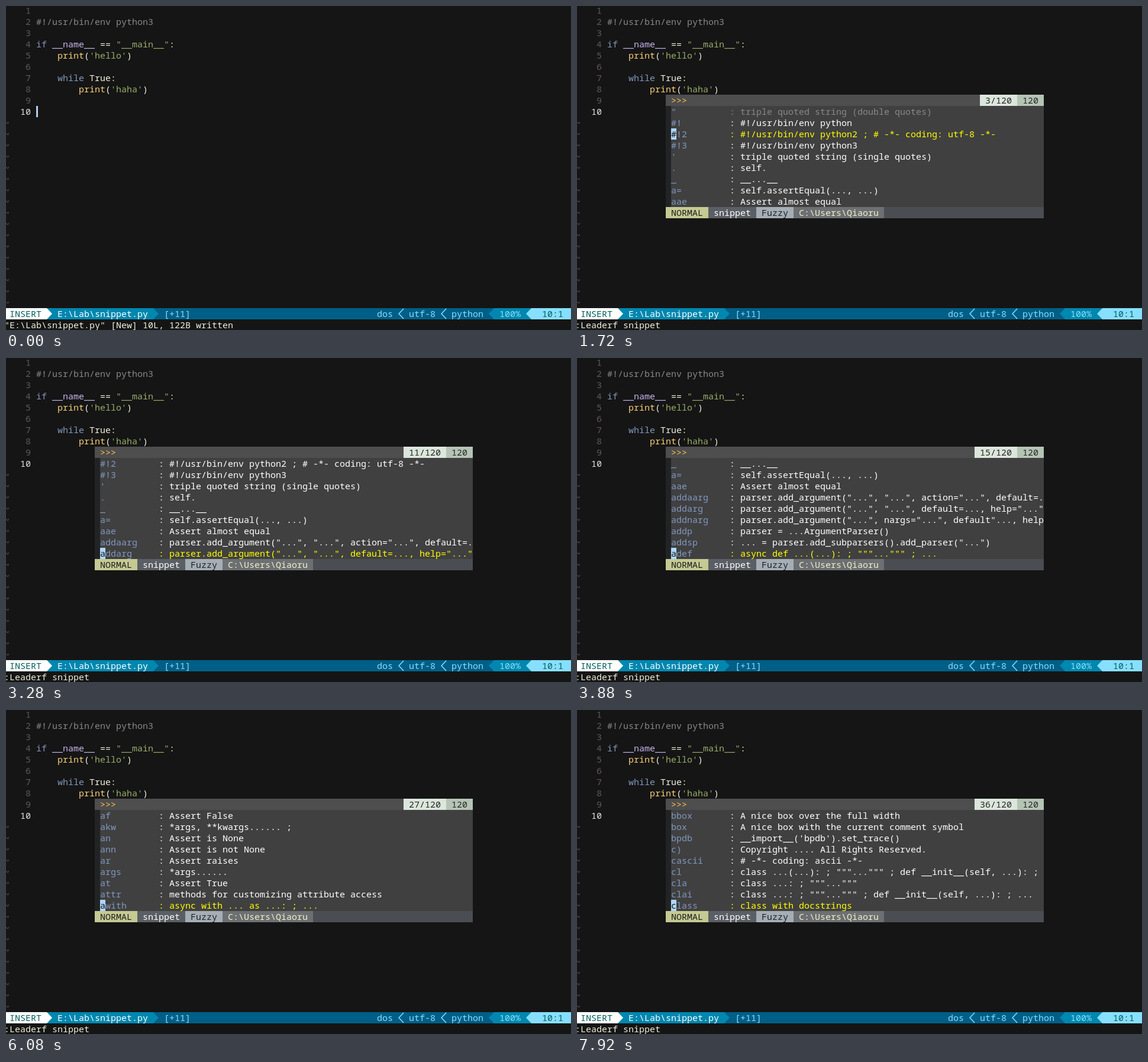
Write an HTML page that moves like this. It is 955x548 px and loops after 8 s.

```html
<!DOCTYPE html>
<html lang="en">
<head>
<meta charset="utf-8">
<title>Snippet finder</title>
<style>
  html, body { margin: 0; width: 100%; height: 100%; overflow: hidden; background: #151515; }
  svg { display: block; width: 955px; height: 548px; }
  text { font: 500 15px "Noto Sans Mono", monospace; font-variant-ligatures: none; white-space: pre; }
</style>
</head>
<body>
<svg viewBox="0 0 955 548">
  <g id="editor"></g>
  <g id="status"></g>
  <g id="popup"></g>
</svg>
<script>
const LOOP = 8000, ROWS = 9;
const FG = '#f0f0dc', BLUE = '#8197bf', GREEN = '#99ad6a', GOLD = '#fad07a', GREY = '#888888';

// Character grid: 9 x 19 px cells
const px = col => col * 9 - 3;
const py = row => row * 19 - 2;
const escapeText = s => s.replace(/&/g, '&amp;').replace(/</g, '&lt;').replace(/>/g, '&gt;');
const text = (col, row, str, fill) =>
  `<text x="${px(col)}" y="${py(row) + 15}" fill="${fill}">${escapeText(str)}</text>`;
const box = (col, row, cols, fill, rows = 1) =>
  `<rect x="${px(col)}" y="${py(row)}" width="${cols * 9}" height="${rows * 19}" fill="${fill}"/>`;
const runs = (col, row, ...parts) => parts.map(([str, fill]) => {
  const out = text(col, row, str, fill);
  col += str.length;
  return out;
}).join('');
const arrow = (col, row, dir, fill) => {
  const x = px(dir > 0 ? col : col + 1), y = py(row);
  return `<path d="M${x} ${y}l${9 * dir} 9.5l${-9 * dir} 9.5z" fill="${fill}"/>`;
};
const chevron = (col, row, stroke) =>
  `<path d="M${px(col + 1)} ${py(row) + 1}l-8 8.5l8 8.5" fill="none" stroke="${stroke}" stroke-width="1.5"/>`;

function drawEditor(command, cursor) {
  let out = '';
  for (let n = 1; n <= 10; n++)
    out += text(3, n - 1, String(n).padStart(2), n === 10 ? '#e8e4e0' : '#605958');
  for (let row = 10; row < 27; row++) out += text(0, row, '~', '#606060');
  out += text(6, 1, '#!/usr/bin/env python3', GREY);
  out += runs(6, 3, ['if ', BLUE], ['__name__', '#c6b6ee'], [' == ', FG], ['"__main__"', GREEN], [':', FG]);
  out += runs(10, 4, ['print', GOLD], ['(', FG], ["'hello'", GREEN], [')', FG]);
  out += runs(10, 6, ['while ', BLUE], ['True:', FG]);
  out += runs(14, 7, ['print', GOLD], ['(', FG], ["'haha'", GREEN], [')', FG]);
  if (cursor) out += `<rect x="51" y="169" width="3" height="19" fill="#b0d0f0"/>`;
  return out + text(0, 28, command, FG);
}

const THEMES = {
  INSERT: { mode: '#ffffff', modeFg: '#005f5f', mid: '#0087af', bar: '#005f87', soft: '#87dfff', end: '#87dfff', endFg: '#005f5f' },
  NORMAL: { mode: '#afdf00', modeFg: '#005f00', mid: '#585858', bar: '#303030', soft: '#9e9e9e', end: '#d0d0d0', endFg: '#606060' }
};

function drawStatus(mode) {
  const c = THEMES[mode], row = 27;
  return box(0, row, 107, c.bar)
    + box(0, row, 28, c.mid) + arrow(28, row, 1, c.mid)
    + box(0, row, 8, c.mode) + arrow(8, row, 1, c.mode)
    + text(1, row, mode, c.modeFg)
    + text(10, row, 'E:\\Lab\\snippet.py', '#ffffff')
    + text(30, row, '[+11]', c.soft)
    + text(70, row, 'dos', c.soft) + chevron(74, row, c.soft)
    + text(76, row, 'utf-8', c.soft) + chevron(82, row, c.soft)
    + text(84, row, 'python', c.soft)
    + arrow(91, row, -1, c.mid) + box(92, row, 15, c.mid)
    + text(93, row, '100%', c.soft)
    + arrow(98, row, -1, c.end) + box(99, row, 8, c.end)
    + text(101, row, '10:1', c.endFg);
}

const SNIPPETS = String.raw`" : triple quoted string (double quotes)
#! : #!/usr/bin/env python
#!2 : #!/usr/bin/env python2 ; # -*- coding: utf-8 -*-
#!3 : #!/usr/bin/env python3
' : triple quoted string (single quotes)
. : self.
_ : __...__
a= : self.assertEqual(..., ...)
aae : Assert almost equal
addaarg : parser.add_argument("...", "...", action="...", default=.
addarg : parser.add_argument("...", "...", default=..., help="..."
addnarg : parser.add_argument("...", nargs="...", default"..., help
addp : parser = ...ArgumentParser()
addsp : ... = parser.add_subparsers().add_parser("...")
adef : async def ...(...): ; """...""" ; ...
adeff : async def ...(...): ; ...
adefm : async def ...(self, ...): ; ... ;
ae : Assert equal
af : Assert False
akw : *args, **kwargs...... ;
an : Assert is None
ann : Assert is not None
ar : Assert raises
args : *args......
at : Assert True
attr : methods for customizing attribute access
awith : async with ... as ...: ; ...
bbox : A nice box over the full width
box : A nice box with the current comment symbol
bpdb : __import__('bpdb').set_trace()
c) : Copyright .... All Rights Reserved.
cascii : # -*- coding: ascii -*-
cl : class ...(...): ; """...""" ; def __init__(self, ...): ;
cla : class ...: ; """..."""
clai : class ...: ; """...""" ; def __init__(self, ...): ; ...
class : class with docstrings`.split('\n').map(line => {
  const at = line.indexOf(' : ');
  return [line.slice(0, at), line.slice(at + 1)];
});

function drawPopup(selected, mode) {
  const normal = mode === 'NORMAL';
  const count = ` ${selected}/120 `, countCol = 83 - count.length;
  let out = box(17, 8, 71, '#4e4e4e') + text(18, 8, '>>>', '#ffc04b')
    + box(countCol, 8, count.length, '#dce6dc') + text(countCol, 8, count, '#262626')
    + box(83, 8, 5, '#b5c4b5') + text(83, 8, ' 120 ', '#262626')
    + box(17, 9, 1, '#222324', ROWS) + box(18, 9, 70, '#404040', ROWS);
  if (!normal) out += box(22, 8, 1, '#b0d0f0');

  const top = Math.max(1, selected - ROWS + 1);
  for (let i = 0; i < ROWS; i++) {
    const n = top + i, row = 9 + i, active = n === selected;
    const [key, desc] = SNIPPETS[n - 1];
    out += text(18, row, key, BLUE);
    out += text(29, row, desc, active ? '#ffff00' : n === 1 ? GREY : '#ffffff');
    if (active && normal) out += box(18, row, 1, '#afd7ff') + text(18, row, key[0], '#151515');
  }

  return out + box(17, 18, 71, '#4a4e52')
    + box(17, 18, 8, normal ? '#c4ca92' : '#b4d0a4') + text(18, 18, mode, '#202020')
    + box(25, 18, 9, '#5a5f65') + text(26, 18, 'snippet', '#ffffff')
    + box(34, 18, 7, '#a5adb5') + text(35, 18, 'Fuzzy', '#202428')
    + box(41, 18, 17, '#6c7073') + text(42, 18, 'C:\\Users\\Qiaoru', '#f5eec8');
}

// Bursts of key presses: first, last, count
const BURSTS = [
  [1560, 1720, 2], [2040, 2800, 6], [3120, 3880, 6], [4200, 5120, 7], [5280, 5440, 2],
  [5760, 6680, 7], [6840, 7000, 2], [7320, 7480, 2], [7920, 7920, 1]
];
const PRESSES = BURSTS.flatMap(([from, to, n]) => Array.from({ length: n }, (_, k) =>
  Math.round((from + (to - from) * k / Math.max(1, n - 1)) / 40) * 40));

const layers = ['editor', 'status', 'popup'].map(id => document.getElementById(id));
let shown = '';

function frame() {
  const t = performance.now() % LOOP;
  const selected = 1 + PRESSES.filter(p => p <= t).length;
  const started = t >= 320, open = t >= 480;
  const popupMode = t < 1080 ? 'INSERT' : 'NORMAL';
  const editorMode = started && t < 1240 ? 'NORMAL' : 'INSERT';
  const state = [selected, started, open, popupMode, editorMode].join();
  if (state !== shown) {
    shown = state;
    const command = started ? ':Leaderf snippet' : '"E:\\Lab\\snippet.py" [New] 10L, 122B written';
    layers[0].innerHTML = drawEditor(command, !started);
    layers[1].innerHTML = drawStatus(editorMode);
    layers[2].innerHTML = open ? drawPopup(selected, popupMode) : '';
  }
  requestAnimationFrame(frame);
}
frame();
</script>
</body>
</html>
```
